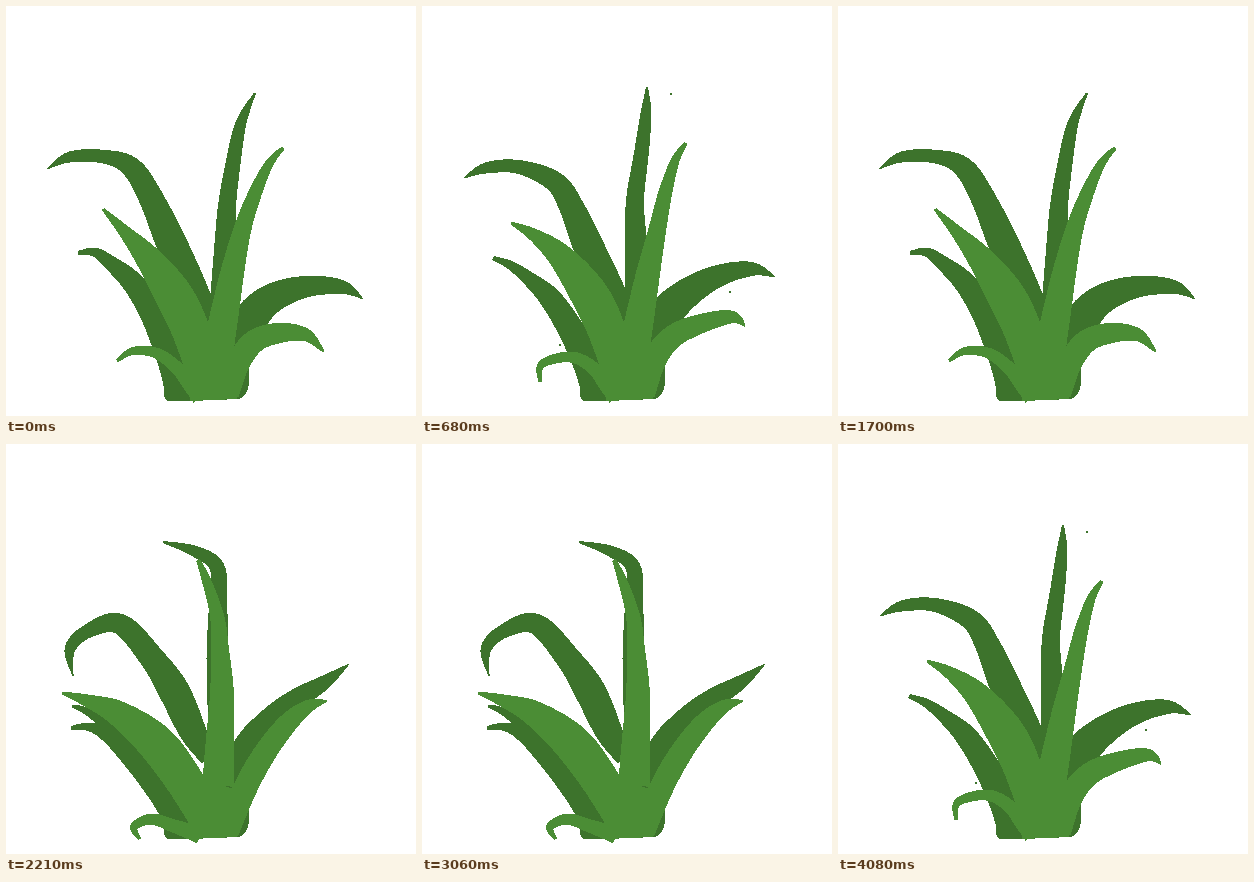
Write an HTML page that moves like this. It is 410x410 px and loops after 4250 ms.

```html
<!DOCTYPE html>
<html lang="en">
<head>
<meta charset="utf-8">
<title>Swaying plant</title>
<style>
html, body { margin: 0; width: 100%; height: 100%; overflow: hidden; background: #fff; }
svg { display: block; width: 100vw; height: 100vh; }
</style>
</head>
<body>
<svg id="stage" viewBox="0 0 410 410" shape-rendering="crispEdges"></svg>
<script>
const STEP = 170;
const DARK = '#3d732c', LIGHT = '#4b8d35';

// A leaf is a tapered band along a spine from tip to root.
// width: across the spine at each key point; root: fixed end;
// upright, leaning, drooping: the moving key points.
const leaves = [
  { fill: DARK, width: [1, 11, 14, 21, 25, 31, 27, 14], root: [202, 316],
    upright: [[41, 163], [64, 151], [100, 151], [126, 162], [146, 194], [168, 243], [194, 298]],
    leaning: [[42, 172], [64, 162], [97, 161], [133, 176], [150, 202], [169, 246], [194, 296]],
    drooping: [[67, 232], [64, 205], [82, 187], [114, 180], [146, 214], [168, 247], [187, 288]] },
  { fill: DARK, width: [2, 11, 15, 18, 21, 6], root: [206, 306],
    upright: [[249, 87], [235, 117], [227, 158], [221, 200], [218, 250]],
    leaning: [[225, 81], [224, 108], [219, 150], [213, 195], [213, 245]],
    drooping: [[157, 98], [188, 107], [211, 123], [212, 160], [211, 215]] },
  { fill: DARK, width: [1, 14, 22, 30, 34, 20], root: [222, 345],
    upright: [[357, 293], [336, 281], [298, 281], [263, 294], [239, 319]],
    leaning: [[353, 271], [330, 263], [296, 270], [264, 288], [240, 312]],
    drooping: [[343, 220], [319, 238], [290, 256], [266, 278], [243, 306]] },
  { fill: DARK, width: [4, 9, 14, 22, 26, 30, 25], root: [172, 385],
    upright: [[72, 247], [88, 246], [102, 255], [127, 277], [147, 308], [165, 350]],
    leaning: [[71, 252], [88, 259], [106, 272], [128, 292], [148, 322], [165, 355]],
    drooping: [[65, 284], [84, 283], [102, 292], [125, 312], [146, 336], [165, 361]] },
  { fill: DARK, width: [3, 7, 11, 12], root: [175, 315],
    upright: [[125, 232], [138, 247], [152, 267]],
    leaning: [[112, 230], [130, 243], [150, 266]],
    drooping: [[66, 262], [80, 267], [108, 284]] },
  { fill: LIGHT, width: [3, 13, 26, 38, 38, 36], root: [202, 376],
    upright: [[97, 203], [119, 226], [142, 252], [167, 288], [185, 325]],
    leaning: [[89, 217], [112, 229], [139, 251], [167, 288], [185, 325]],
    drooping: [[56, 249], [82, 257], [113, 270], [150, 299], [178, 336]] },
  { fill: LIGHT, width: [4, 9, 14, 18, 24, 28, 32], root: [212, 342],
    upright: [[277, 142], [263, 158], [248, 190], [236, 225], [226, 268], [219, 305]],
    leaning: [[264, 137], [253, 155], [243, 188], [235, 225], [226, 268], [219, 305]],
    drooping: [[192, 116], [200, 135], [211, 172], [214, 205], [216, 250], [214, 295]] },
  { fill: LIGHT, width: [2, 13, 20, 23, 24, 22], root: [222, 388],
    upright: [[318, 346], [300, 329], [274, 327], [249, 335], [232, 357]],
    leaning: [[323, 320], [309, 311], [275, 319], [249, 332], [232, 355]],
    drooping: [[321, 257], [303, 262], [281, 280], [257, 312], [238, 347]] },
  { fill: LIGHT, width: [3, 8, 11, 13, 15, 16], root: [194, 392],
    upright: [[111, 355], [127, 345], [150, 347], [170, 361], [185, 380]],
    leaning: [[118, 376], [120, 358], [148, 351], [170, 361], [185, 380]],
    drooping: [[134, 395], [128, 383], [145, 375], [165, 381], [182, 387]] }
];

// The falling step lies halfway from leaning to drooping.
const cycle = [
  { from: 'upright' },
  { from: 'leaning', dots: [[307, 285], [137, 338]] },
  { from: 'leaning', to: 'drooping' },
  { from: 'drooping' },
  { from: 'leaning', dots: [[307, 285], [137, 338], [248, 87]] }
];

const svg = document.getElementById('stage');

function add(parent, tag, attrs) {
  const el = document.createElementNS('http://www.w3.org/2000/svg', tag);
  for (const k in attrs) el.setAttribute(k, attrs[k]);
  return parent.appendChild(el);
}

const mix = (a, b, u) => a.map((v, i) => v + (b[i] - v) * u);

// Catmull-Rom point on the segment from key i to i + 1.
function spline(keys, i, u) {
  const b = keys[i], c = keys[i + 1] || b;
  const a = keys[i - 1] || b, d = keys[i + 2] || c;
  return b.map((v, k) => v + u / 2 * (c[k] - a[k]
    + u * (2 * a[k] - 5 * v + 4 * c[k] - d[k]
    + u * (3 * (v - c[k]) + d[k] - a[k]))));
}

function outline(leaf, { from, to = from }) {
  const spine = leaf[from].map((p, i) => mix(p, leaf[to][i], 0.5));
  const keys = [...spine, leaf.root].map((p, i) => [...p, leaf.width[i]]);
  const pts = [];
  for (let s = 0; s <= (keys.length - 1) * 8; s++) pts.push(spline(keys, s >> 3, s % 8 / 8));
  const left = [], right = [];
  pts.forEach(([x, y, w], i) => {
    const a = pts[Math.max(i - 1, 0)], b = pts[Math.min(i + 1, pts.length - 1)];
    const dx = b[0] - a[0], dy = b[1] - a[1], k = w / 2 / Math.hypot(dx, dy);
    left.push([x + dy * k, y - dx * k]);
    right.unshift([x - dy * k, y + dx * k]);
  });
  return 'M' + [...left, ...right].map(p => p.map(v => v.toFixed(1))).join('L') + 'Z';
}

const groups = cycle.map(pose => {
  const g = add(svg, 'g', { visibility: 'hidden' });
  const shape = (d, fill) => add(g, 'path', { d, fill });
  const grow = fill => leaves.filter(l => l.fill === fill).forEach(l => shape(outline(l, pose), fill));
  shape('M153 345Q157 365 158 388Q158 395 164 395H185L233 393Q241 390 243 378V355L226 345Z', DARK);
  grow(DARK);
  shape('M200 335L186 371L184 395L231 393L236 370L227 345Z', LIGHT);
  grow(LIGHT);
  (pose.dots || []).forEach(([x, y]) => add(g, 'rect', { x, y, width: 2, height: 1.5, fill: DARK }));
  return g;
});

function draw(t) {
  const now = Math.floor(t / STEP) % cycle.length;
  groups.forEach((g, i) => g.setAttribute('visibility', i === now ? 'visible' : 'hidden'));
}

const start = performance.now();
function tick() {
  draw(performance.now() - start);
  requestAnimationFrame(tick);
}
tick();
</script>
</body>
</html>
```
